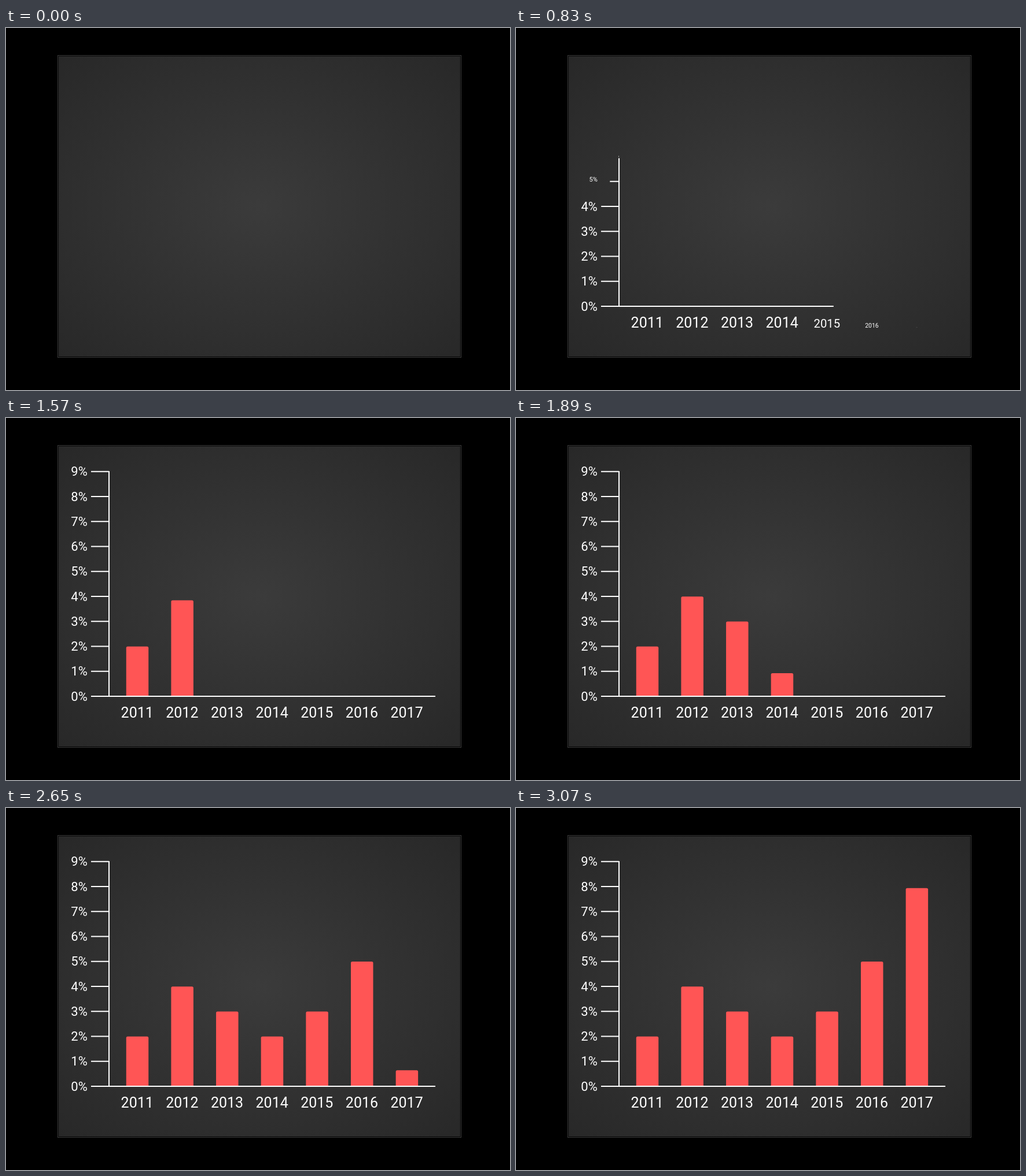
Animation, 871 px wide and 627 px high, one loop 3110 ms. Source, as an HTML page:

```html
<!DOCTYPE html>
<html lang="en">
<head>
<meta charset="utf-8">
<title>Yearly chart</title>
<style>
  html, body { margin: 0; width: 100%; height: 100%; overflow: hidden; background: #000; }
  svg { display: block; width: 100%; height: 100%; }
  text { font-family: Roboto, sans-serif; fill: #fff; }
  .pct { font-size: 22px; text-anchor: end; }
  .year { font-size: 25px; text-anchor: middle; }
  .line { stroke: #fff; stroke-width: 2; fill: none; }
</style>
</head>
<body>
<svg id="stage" viewBox="0 0 871 627">
  <defs>
    <radialGradient id="glow" cx=".5" cy=".5" r=".707">
      <stop offset="0" stop-color="#3b3b3b"/>
      <stop offset="1" stop-color="#282828"/>
    </radialGradient>
  </defs>
  <rect width="871" height="627" fill="#000"/>
  <rect x="89" y="47" width="698" height="524" fill="url(#glow)"/>
  <rect x="89.5" y="47.5" width="697" height="523" fill="none" stroke="#3c3c3c"/>
  <rect x="90.5" y="48.5" width="695" height="521" fill="none" stroke="#000"/>
  <g id="chart"></g>
</svg>
<script>
const LOOP = 3110, START = 420;
const X0 = 178, Y0 = 482, UNIT = 43.25;
const AXIS_W = 564, AXIS_H = 390;
const BAR_W = 38.5, FIRST_X = 227, GAP = 77.65;
const POP = 150;
const values = [2, 4, 3, 2, 3, 5, 8];
// each bar grows between two neighbouring times
const marks = [1165, 1320, 1604, 1810, 1980, 2180, 2557, 3098];

const chart = document.getElementById('chart');

function add(tag, attrs, text) {
  const el = document.createElementNS('http://www.w3.org/2000/svg', tag);
  for (const k in attrs) el.setAttribute(k, attrs[k]);
  if (text) el.textContent = text;
  chart.appendChild(el);
  return el;
}

const progress = (t, from, to) => Math.min(1, Math.max(0, (t - from) / (to - from)));
const smooth = s => s * s * (3 - 2 * s);

function scaleAt(el, x, y, k) {
  el.setAttribute('transform', `translate(${x} ${y}) scale(${k})`);
  el.setAttribute('visibility', k > 0.02 ? 'visible' : 'hidden');
}

const bars = values.map((v, i) => ({
  el: add('path', { fill: '#ff5555' }),
  x: FIRST_X + i * GAP - BAR_W / 2,
  h: v * UNIT - 0.3,
  from: marks[i],
  to: marks[i + 1]
}));

const years = values.map((v, i) => ({
  el: add('text', { class: 'year' }, String(2011 + i)),
  x: FIRST_X + i * GAP - 0.3,
  from: 473 + 59 * i
}));

const levels = Array.from({ length: 10 }, (_, i) => ({
  tick: add('path', { class: 'line' }),
  label: add('text', { class: 'pct', y: 15.6 }, i + '%'),
  y: Y0 - i * UNIT,
  from: 390 + 73 * i
}));

const axes = add('path', { class: 'line' });

function barPath(x, h) {
  if (h <= 0) return '';
  const r = Math.min(2.5, h);
  return `M${x} ${Y0}v${r - h}q0 ${-r} ${r} ${-r}h${BAR_W - 2 * r}q${r} 0 ${r} ${r}v${h - r}z`;
}

function draw(t) {
  chart.setAttribute('visibility', t < START ? 'hidden' : 'visible');
  chart.style.display = t < START ? 'none' : '';

  const a = smooth(progress(t, 481, 1058));
  axes.setAttribute('d', a > 0
    ? `M${X0} ${Y0 + 1}V${Y0 - AXIS_H * a}M${X0 - 1} ${Y0}H${X0 + AXIS_W * a}` : '');

  for (const l of levels) {
    const k = progress(t, l.from, l.from + POP);
    l.tick.setAttribute('d', k > 0 ? `M${X0} ${l.y}h${-31 * k}` : '');
    scaleAt(l.label, 140.8, l.y - 8, k);
  }
  for (const y of years) scaleAt(y.el, y.x, 519.3, progress(t, y.from, y.from + POP));
  for (const b of bars) {
    b.el.setAttribute('d', barPath(b.x, b.h * smooth(progress(t, b.from, b.to))));
  }
}

const begin = performance.now();
function frame() {
  draw((performance.now() - begin) % LOOP);
  requestAnimationFrame(frame);
}
frame();
</script>
</body>
</html>
```
